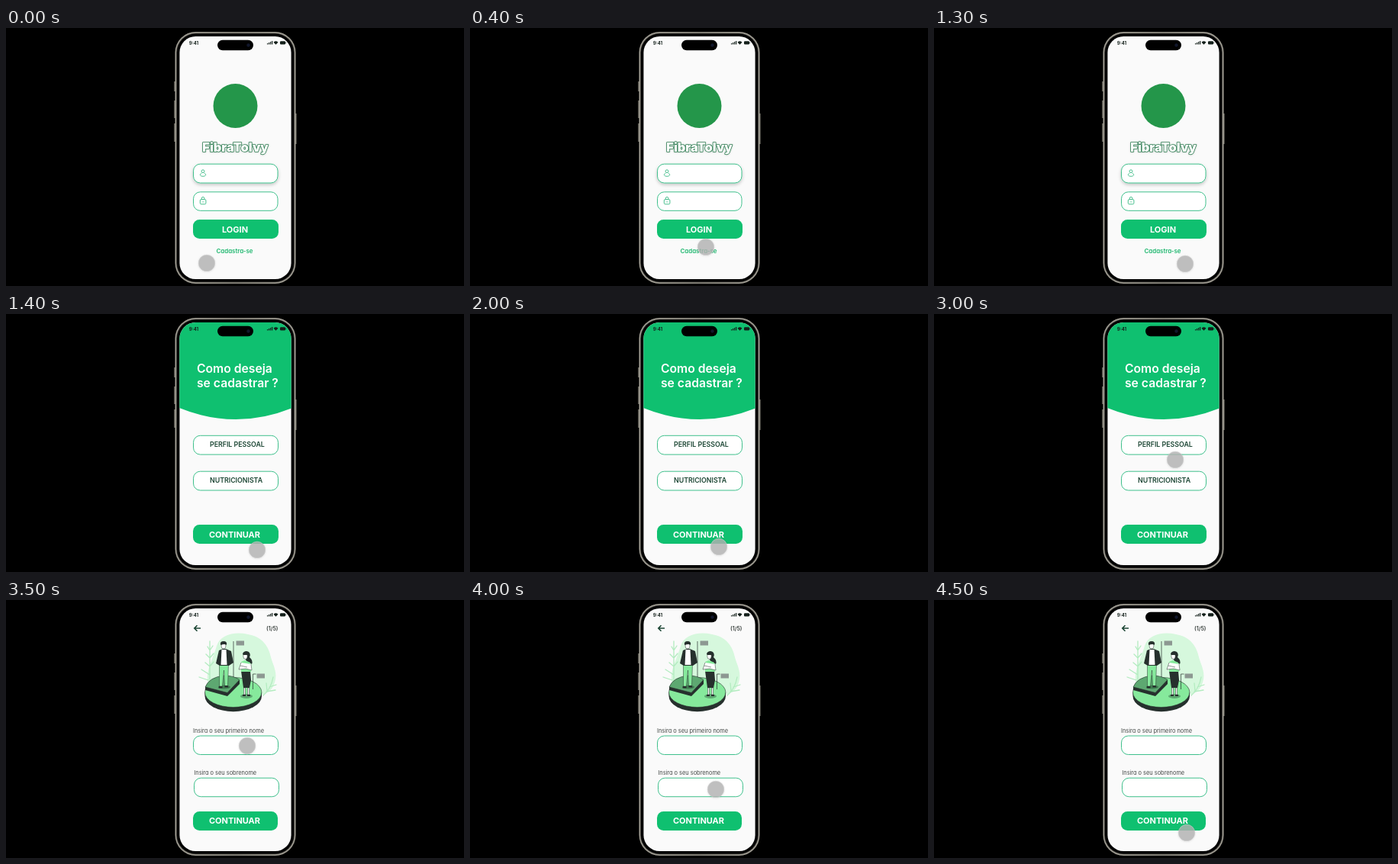
An HTML page for the animation above (5000 ms loop, 600 px wide and 338 px high).

```html
<!DOCTYPE html>
<html lang="pt">
<head>
<meta charset="utf-8">
<style>
  html, body { margin: 0; width: 100%; height: 100%; overflow: hidden; background: #000; }
  svg { display: block; width: 100vw; height: 100vh; font-family: Inter, Roboto, sans-serif; }
  .field { fill: #fff; stroke: #3fc08c; stroke-width: 1; }
  .btn { fill: #0fc070; }
  .cta { fill: #fff; font-size: 11px; font-weight: 650; text-anchor: middle; }
  .title { fill: #fff; font-size: 15.7px; font-weight: 600; }
  .opt { fill: #1c4634; font-size: 8.8px; font-weight: 600; }
  .label { fill: #454a48; font-size: 7.4px; }
  .label, .link { font-feature-settings: "cv11"; }
  .link { fill: #20b870; font-size: 7.9px; font-weight: 600; text-anchor: middle; }
  .icon { fill: none; stroke: #35b882; stroke-width: .9; }
  .ink { fill: #26302d; }
  .mint { fill: #86e99c; }
  .skin { fill: #fff; stroke: #26302d; stroke-width: .5; }
  .pale { fill: none; stroke: #b3ecc0; stroke-width: 1.3; stroke-linecap: round; }
</style>
</head>
<body>
<svg viewBox="0 0 600 338">
  <defs>
    <clipPath id="glass"><rect x="227.4" y="11" width="146.200" height="318" rx="21"/></clipPath>
    <filter id="drop" x="-30%" y="-30%" width="160%" height="190%">
      <feDropShadow dx="0" dy="2" stdDeviation="2" flood-opacity=".22"/>
    </filter>
    <filter id="glow" x="-30%" y="-30%" width="160%" height="160%">
      <feDropShadow dx="0" dy=".5" stdDeviation="1.2" flood-opacity=".15"/>
    </filter>
    <linearGradient id="metal" x2="1">
      <stop offset="0" stop-color="#a5a298"/><stop offset=".5" stop-color="#848178"/><stop offset="1" stop-color="#a5a298"/>
    </linearGradient>
  </defs>

  <rect width="600" height="338"/>
  <path d="M221 70v13M221 95v23M221 125v24M379.800 112v40" stroke="#77746c" stroke-width="1.600"/>
  <rect x="221.500" y="5" width="158" height="330" rx="27" fill="url(#metal)"/>
  <rect x="223" y="6.700" width="155" height="326.600" rx="25.500" fill="#45433f"/>
  <rect x="224" y="7.600" width="153" height="324.800" rx="24.500"/>

  <g clip-path="url(#glass)">
    <rect x="227" y="11" width="148" height="319" fill="#fafafa"/>

    <g class="screen">
      <circle cx="300.500" cy="102" r="29" fill="#24964a"/>
      <text x="300.500" y="162" text-anchor="middle" font-size="16.400" font-weight="900" fill="#fff" stroke="#2c7c50" stroke-width="1.600" stroke-linejoin="round" paint-order="stroke" filter="url(#glow)">FibraTolvy</text>
      <rect class="field" x="245.500" y="178.200" width="110.500" height="24.800" rx="9" filter="url(#drop)"/>
      <rect class="field" x="245.500" y="214.800" width="110.500" height="24.500" rx="9"/>
      <g class="icon">
        <circle cx="258" cy="187.700" r="1.900"/>
        <path d="M256.300 190.300c-3 1-2.600 4 1.700 4s4.700-3 1.700-4"/>
        <rect x="254.300" y="224.500" width="7.600" height="6.300" rx="1.500"/>
        <path d="M256.300 224.500v-1.300a1.800 1.800 0 0 1 3.600 0v1.300M258.100 227v1.500"/>
      </g>
      <rect class="btn" x="245" y="251" width="112" height="25" rx="8.500"/>
      <text class="cta" x="300" y="267.800">LOGIN</text>
      <text class="link" x="299.500" y="295">Cadastra-se</text>
    </g>

    <g class="screen">
      <path class="btn" d="M227 11H375V123Q301 153 227 123Z"/>
      <text class="title" x="250" y="77">Como deseja</text>
      <text class="title" x="250" y="96">se cadastrar ?</text>
      <rect class="field" x="245.500" y="159.300" width="111" height="24.800" rx="9"/>
      <text class="opt" x="267" y="174.300">PERFIL PESSOAL</text>
      <rect class="field" x="245.500" y="206.200" width="111" height="24.800" rx="9"/>
      <text class="opt" x="267" y="221">NUTRICIONISTA</text>
      <rect class="btn" x="245" y="276" width="112" height="25" rx="8.500"/>
      <text class="cta" x="299.500" y="292.500">CONTINUAR</text>
    </g>

    <g class="screen">
      <path d="M255 37h-8M250.500 33.300l-3.700 3.700 3.700 3.700" fill="none" stroke="#1c4634" stroke-width="1.600"/>
      <text x="341" y="39.500" font-size="7.200" font-weight="600" fill="#39403d">(1/5)</text>

      <path d="M276 60C281 45 300 41 317 45C335 48 344 60 347 75C351 88 356 96 352 108C349 120 338 126 320 126C298 128 273 126 266 112C259 97 271 78 276 60Z" fill="#d6f8dd"/>
      <path class="pale" d="M267 107V54M267 66l-3-5M267 66l4-6M267 76l-5-5M267 76l5-6M267 87l-6-5M267 87l5-6M267 98l-11-7M265 105l-12-4M337 125q10-8 13-24M342 119l-1-10M345 114l9-3M341 120l12-2"/>
      <path d="M260.500 121v5a37 20 0 0 0 74.500 0v-5z" class="ink"/>
      <ellipse class="mint" cx="297.700" cy="121" rx="37.200" ry="19.500" stroke="#26302d" stroke-width=".6"/>
      <path class="ink" d="M261 114v4l29 8 16-16v-5z"/>
      <path d="M261 114Q266 101 286 99Q298 99 306 104.500L290 121.500Z" fill="#5da871" stroke="#26302d" stroke-width=".6"/>
      <ellipse cx="286" cy="114" rx="8" ry="2.500" fill="#3e7c50"/>
      <ellipse cx="315" cy="126" rx="8" ry="3" fill="#5da871"/>
      <path d="M298 101V54M323.500 117V97h4" fill="none" stroke="#26302d" stroke-width=".7"/>
      <path d="M301.500 53.500h10.500v6h-10.500zM328.500 96.500h10.500v6h-10.500z" fill="#8d9892"/>

      <path class="mint" d="M279.500 83h12l-1 30h-4l-1-21-2 21h-4z" stroke="#26302d" stroke-width=".5"/>
      <path class="ink" d="M279 66l5-2h4l7 3 3 15-6 4h-12l-5-3z"/>
      <path d="M282.500 65h6l1 20h-8z" fill="#fff"/>
      <ellipse class="skin" cx="285" cy="60" rx="3" ry="4"/>
      <path class="ink" d="M281 59q-1-5 4-5 5 0 4 5-2-2-8 0zM279 113h4.500v2.500h-5zM286.500 112h4l1 2.500h-5z"/>

      <path class="ink" d="M310 70q3-5 8-2 3 3 1 7 5 4 3 9l-7-4zM308 93h12l1 12-2 10h-8z"/>
      <path class="skin" d="M311.500 115h2v9h-2zM316.500 115h2v9h-2z"/>
      <path class="mint" d="M308 81l5-2 7 3 1 12h-13z"/>
      <path class="skin" d="M308 82l-3 9 9-1 8 2-1-8M307 86l9 2"/>
      <ellipse class="skin" cx="313.500" cy="73.500" rx="2.700" ry="4"/>
      <path class="ink" d="M310.500 72q0-5 5-4l1 4zM310 124h4v2h-4zM316 124h4v2h-4z"/>

      <text class="label" x="245" y="173.500">Insira o seu primeiro nome</text>
      <rect class="field" x="245.500" y="178" width="111" height="24.500" rx="9"/>
      <text class="label" x="246.300" y="228.500">Insira o seu sobrenome</text>
      <rect class="field" x="246.500" y="233.200" width="111" height="24.500" rx="9"/>
      <rect class="btn" x="245" y="277" width="111" height="25" rx="8.500"/>
      <text class="cta" x="299.500" y="293.300">CONTINUAR</text>
    </g>

    <g fill="#14201b">
      <text x="239.800" y="22" font-size="6" font-weight="700">9:41</text>
      <path d="M342 20h1.200v1.500h-1.200zM344 19h1.200v2.500h-1.200zM346 18h1.200v3.500h-1.200zM348 17h1.200v4.500h-1.200zM350.500 18.700q3-2.800 6 0l-3 3z"/>
      <rect x="359" y="17.300" width="7" height="4.200" rx="1.200"/>
      <rect x="366.500" y="18.600" width=".7" height="1.600"/>
    </g>
  </g>

  <rect x="277" y="15.800" width="47" height="13.400" rx="6.700"/>
  <circle cx="317.500" cy="22.500" r="2.200" fill="#11162b"/>
  <circle id="touch" r="10.800" fill="#b3b3b3" fill-opacity=".8" stroke="#cfcfcf" stroke-opacity=".7" stroke-width=".8" filter="url(#glow)"/>
</svg>
<script>
  // [start ms, x, y] of each pointer stop
  const stops = [
    [0, 263, 308], [400, 309, 287], [1300, 329, 309], [1800, 326, 305],
    [2400, 321, 282], [3000, 316, 191], [4000, 322, 248], [4500, 331, 305]
  ];
  const screens = [...document.querySelectorAll('.screen')];
  const touch = document.getElementById('touch');

  function draw() {
    const t = performance.now() % 5000;
    const current = t < 1400 ? 0 : t < 3500 ? 1 : 2;
    screens.forEach((s, i) => s.style.display = i === current ? '' : 'none');
    const [, x, y] = stops.filter(s => s[0] <= t).pop();
    touch.setAttribute('transform', `translate(${x} ${y})`);
    requestAnimationFrame(draw);
  }
  draw();
</script>
</body>
</html>
```
